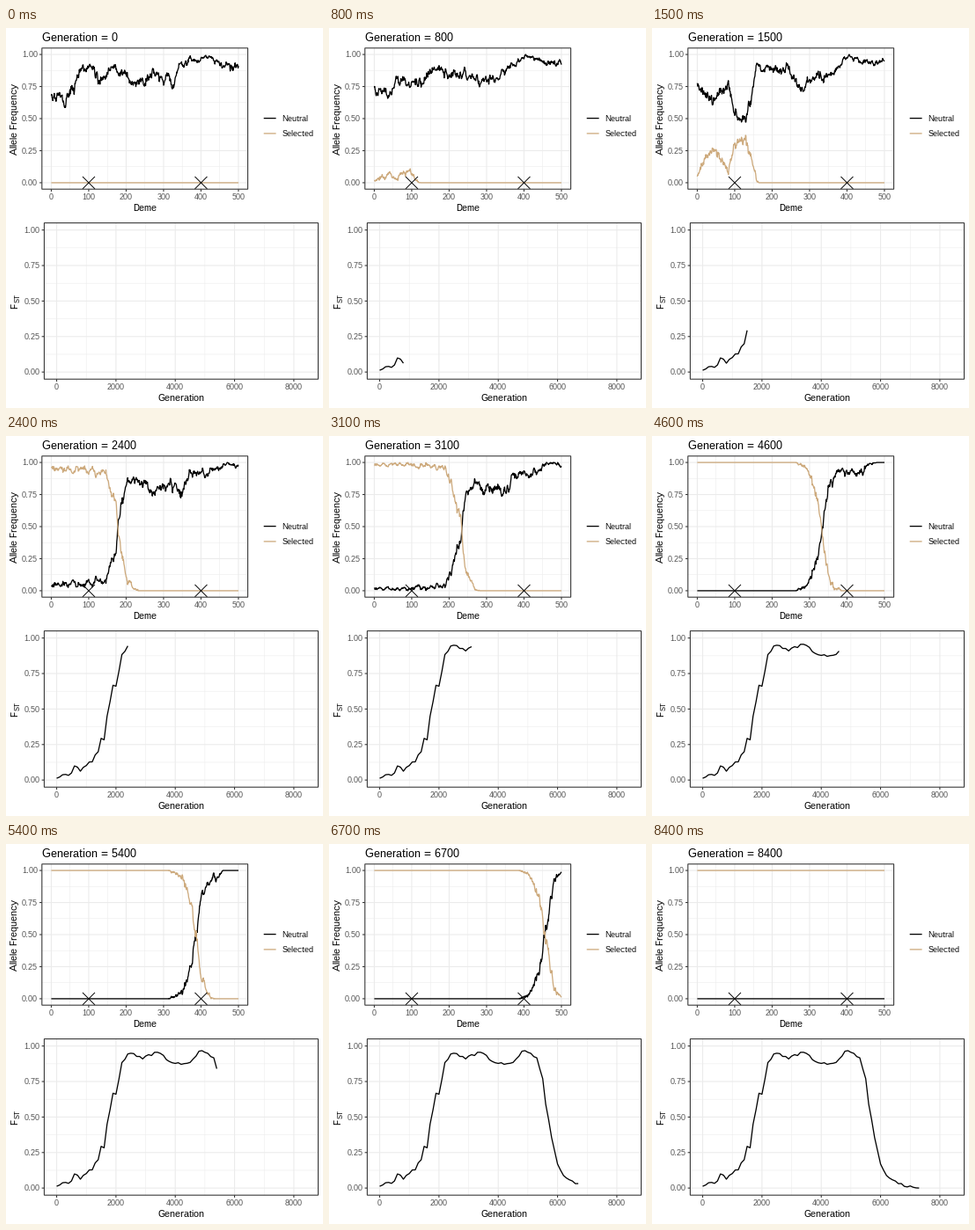
Recreate the animation shown at these times as a matplotlib script. Size 360 by 432 pixels, loop 8500 ms.

```python
import numpy as np
import matplotlib.pyplot as plt
from matplotlib.animation import FuncAnimation
from matplotlib.patches import Rectangle

W, H = 360, 432
BLACK, TAN, EDGE, GRID = "black", "#CDAA7D", "#333333", "#EBEBEB"
STEP, FRAMES = 100, 85

# Whole-pixel glyph advances
plt.rcParams["font.family"] = "Liberation Sans"
plt.rcParams["text.hinting"] = "default"
plt.rcParams["text.hinting_factor"] = 1

demes = np.arange(501)


def through(x, points):
    """Straight segments through (x, y) points."""
    return np.interp(x, *zip(*points))


FRONT = [(2400, 181), (3900, 287), (5400, 385), (5800, 398), (6700, 459),
         (8400, 582)]

# Selected allele at generation 1500, before the wave has formed
HUMPS = through(demes, [(0, .05), (25, .2), (55, .23), (80, .11), (95, .24),
                        (118, .34), (135, .28), (160, .01), (170, 0)])

# Neutral allele among chromosomes not yet swept, by generation
NEUTRAL = {gen: through(demes, points) for gen, points in {
    0: [(0, .68), (38, .65), (75, .84), (103, .92), (130, .8), (160, .89),
        (225, .78), (280, .87), (300, .78), (330, .78), (342, .91), (405, .98),
        (500, .9)],
    1500: [(0, .81), (70, .87), (115, .73), (145, .84), (155, .93), (210, .86),
           (240, .9), (280, .7), (310, .84), (340, .8), (405, .99), (445, .94),
           (500, .96)],
    2400: [(180, .96), (230, .87), (270, .78), (330, .83), (345, .73),
           (370, .91), (440, .94), (470, 1), (500, .96)],
    3900: [(280, .92), (290, .79), (355, .81), (370, .88), (440, .91), (460, .98),
           (480, 1)],
    5400: [(380, .98), (410, .94), (440, .94), (460, 1)],
    6700: [(0, 1)],
    8400: [(0, 1)],
}.items()}

FST = [(0, .015), (500, .05), (600, .105), (800, .075), (1200, .125),
       (1600, .31), (1900, .68), (2000, .67), (2200, .88), (2500, .96),
       (2800, .92), (3400, .955), (4000, .87), (4500, .89), (4900, .97),
       (5300, .92), (5500, .76), (5700, .46), (6000, .16), (6200, .08),
       (6800, .015), (7300, 0)]


def noisy(p, rng, size):
    e = rng.normal(size=len(p)) if size < .04 else np.convolve(
        rng.normal(size=len(p) + 15), np.exp(-np.arange(16) / 4), "valid")
    return np.clip(p + size * e * np.sqrt(p * (1 - p)), 0, 1)


def wave(gen):
    d = demes - through(gen, FRONT)
    s = 1 / (1 + np.exp(d / np.where(d < 0, 14, 10)))
    s *= 1 - .06 * np.clip((3500 - gen) / 1100, 0, 1)
    return np.where(s > .994, 1, np.where(s < .006, 0, s))


def logit(p, eps=.004):
    p = np.clip(p, eps, 1 - eps)
    return np.log(p / (1 - p))


def selected(gen):
    if gen <= 1500:
        u = gen / 1500
        return u ** 2.2 * np.interp(demes / (.45 + .55 * u), demes, HUMPS)
    if gen >= 2400:
        return wave(gen)
    u = (gen - 1500) / 900
    z = (1 - u) * logit(HUMPS) + u * logit(wave(2400))
    return np.clip(1.008 / (1 + np.exp(-z)) - .004, 0, 1)


def unswept(gen):
    a = max(g for g in NEUTRAL if g <= gen)
    b = min(g for g in NEUTRAL if g >= gen)
    u = (gen - a) / max(b - a, 1)
    return (1 - u) * NEUTRAL[a] + u * NEUTRAL[b]


def curves(gen):
    rng = np.random.default_rng(gen + 11)
    s = noisy(selected(gen), rng, .04)
    return noisy(unswept(gen), rng, .04) * (1 - s), s


fst_gens = np.arange(0, 7301, STEP)
fst_values = noisy(through(fst_gens, FST), np.random.default_rng(4), .03)

fig = plt.figure(figsize=(W / 72, H / 72), dpi=72, facecolor="white")
ax = fig.add_axes([0, 0, 1, 1])
ax.set_xlim(0, W)
ax.set_ylim(H, 0)
ax.axis("off")


def line(xs, ys, color, lw, z):
    return ax.plot(xs, ys, color=color, lw=lw, zorder=z, snap=False,
                   solid_capstyle="butt", solid_joinstyle="round")[0]


def label(x, y, s, size, color=BLACK, ha="left", rot=0):
    return ax.text(x, y, s, fontsize=size, color=color, ha=ha, va="baseline",
                   rotation=rot, rotation_mode="anchor", zorder=8)


class Panel:
    def __init__(self, left, top, right, bottom, xmax):
        self.box = left, top, right, bottom
        self.xmax = xmax

    def x(self, v):
        l, _, r, _ = self.box
        return l + (r - l) * (np.asarray(v) / self.xmax + .05) / 1.1

    def y(self, v):
        _, t, _, b = self.box
        return b - (b - t) * (np.asarray(v) + .05) / 1.1

    def draw(self, major, minor):
        l, t, r, b = self.box
        for v in minor:
            line([self.x(v)] * 2, [t, b], GRID, .53, 1)
        for v in np.arange(.125, 1, .25):
            line([l, r], [self.y(v)] * 2, GRID, .53, 1)
        for v in major:
            x = self.x(v)
            line([x, x], [t, b], GRID, 1.07, 2)
            line([x, x], [b, b + 2.75], EDGE, 1.07, 7)
            label(x, b + 11.4, str(v), 8.8, "#4D4D4D", "center")
        for v in np.arange(0, 1.1, .25):
            y = self.y(v)
            line([l, r], [y, y], GRID, 1.07, 2)
            line([l - 2.75, l], [y, y], EDGE, 1.07, 7)
            label(l - 4.95, y + 3.15, f"{v:.2f}", 8.8, "#4D4D4D", "right")
        ax.add_patch(Rectangle((l, t), r - l, b - t, fill=False, ec=EDGE,
                               lw=1.07, zorder=6, snap=False))


freq = Panel(40.8, 22.8, 274.6, 183.2, 500)
fst = Panel(43.4, 221.6, 354.5, 399.2, 8400)
freq.draw(range(0, 501, 100), range(50, 500, 100))
fst.draw(range(0, 8001, 2000), range(1000, 8000, 2000))

title = label(40.8, 15.2, "", 13.2)
label(157.7, 208, "Deme", 11, ha="center")
label(199, 424.2, "Generation", 11, ha="center")
label(13.3, 103, "Allele Frequency", 11, ha="center", rot=90)
label(13.3, 318.7, "F", 11, rot=90)
label(15.6, 312, "ST", 7.7, rot=90)

for y, color, name in [(102.6, BLACK, "Neutral"), (119.9, TAN, "Selected")]:
    line([292.7, 306.6], [y, y], color, 1.3, 4)
    label(313.6, y + 3.15, name, 8.8)

for d in (100, 400):
    x, y = freq.x(d), freq.y(0)
    for k in (-7, 7):
        line([x - 7, x + 7], [y - k, y + k], BLACK, .95, 5)

neutral_line = line([], [], BLACK, 1.3, 3)
selected_line = line([], [], TAN, 1.3, 4)
fst_line = line([], [], BLACK, 1.3, 3)


def draw(i):
    gen = i * STEP
    n, s = curves(gen)
    title.set_text(f"Generation = {gen}")
    neutral_line.set_data(freq.x(demes), freq.y(n))
    selected_line.set_data(freq.x(demes), freq.y(s))
    fst_line.set_data(fst.x(fst_gens[:i + 1]), fst.y(fst_values[:i + 1]))
    return title, neutral_line, selected_line, fst_line


anim = FuncAnimation(fig, draw, frames=FRAMES, init_func=lambda: draw(0),
                     interval=100, repeat=True, repeat_delay=0)
plt.show()
```
